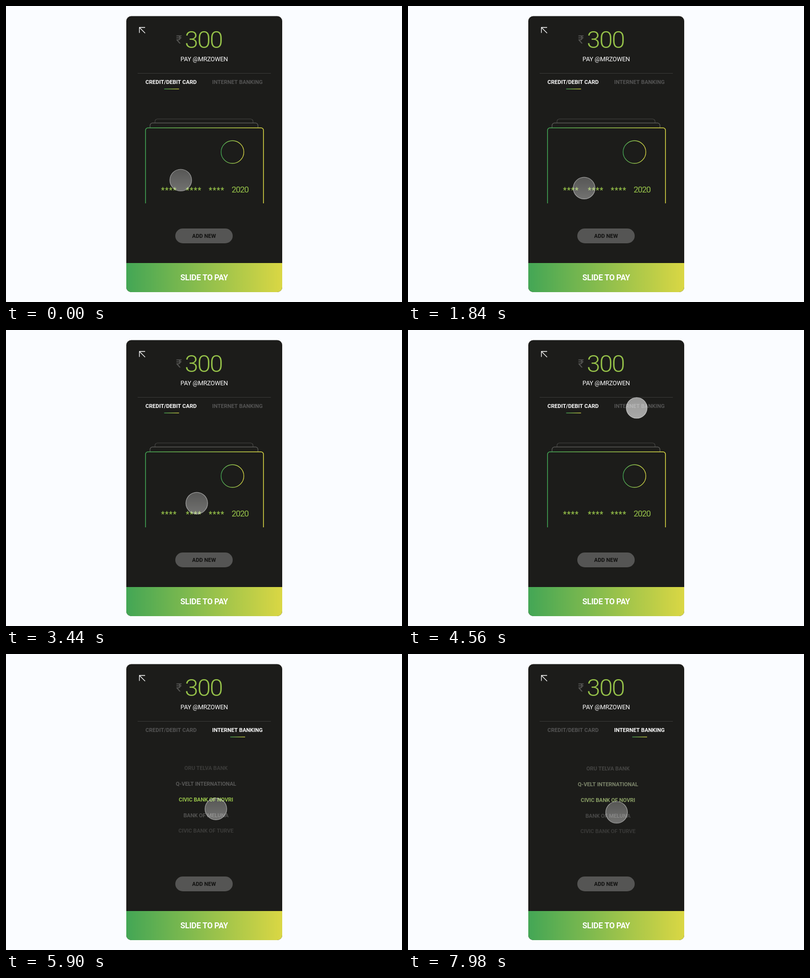
Animation, 800 px wide and 600 px high, one loop 8 s. Source, as an HTML page with a canvas:

```html
<!DOCTYPE html>
<html lang="en">
<head>
<meta charset="utf-8">
<title>Slide to pay</title>
<style>
  html, body { margin: 0; width: 100%; height: 100%; overflow: hidden; background: #fafcff; }
  canvas { display: block; }
</style>
</head>
<body>
<canvas id="stage" width="800" height="600"></canvas>
<script>
const ctx = document.getElementById('stage').getContext('2d');
const LOOP = 8000;
const GREEN = [151, 195, 74];
const DARK = '#1c1c1a';

// Touch point: time, x, y
const touchPath = [
  [0, 353, 353], [1280, 345, 375], [2660, 375, 359], [3400, 385, 352],
  [4400, 462, 158], [4940, 462, 158], [5560, 410, 350], [5880, 424, 314],
  [6620, 418, 342], [7300, 417, 345], [8160, 422, 318]
];

// Name, opacity when the third row is chosen, opacity when the second is
const banks = [
  ['DELVO SARUNDRI', 0.16, 0.16],
  ['ORU TELVA BANK', 0.16, 0.28],
  ['Q-VELT INTERNATIONAL', 0.3, 1],
  ['CIVIC BANK OF NOVRI', 1, 0.3],
  ['BANK OF MELUNA', 0.27, 0.16],
  ['CIVIC BANK OF TURVE', 0.16, 0.16]
];

const mix = (a, b, p) => a + (b - a) * p;
const clamp = v => Math.min(1, Math.max(0, v));
const ease = p => p * p * (3 - 2 * p);
const ramp = (t, from, to) => ease(clamp((t - from) / (to - from)));

function touchAt(t) {
  let i = 1;
  while (i < touchPath.length - 1 && t > touchPath[i][0]) i++;
  const a = touchPath[i - 1], b = touchPath[i];
  const p = ramp(t, a[0], b[0]);
  return [mix(a[1], b[1], p), mix(a[2], b[2], p)];
}

function gradient(x0, x1, from = '#43a655', to = '#dad744') {
  const g = ctx.createLinearGradient(x0, 0, x1, 0);
  g.addColorStop(0, from);
  g.addColorStop(1, to);
  return g;
}

function text(str, x, y, size, weight, color, spacing = 0) {
  ctx.font = `${weight} ${size}px Roboto, sans-serif`;
  ctx.letterSpacing = spacing + 'px';
  ctx.textAlign = 'center';
  ctx.fillStyle = color;
  ctx.fillText(str, x + spacing / 2, y);
}

function stroke(color, width, ...points) {
  ctx.beginPath();
  points.forEach(([x, y]) => ctx.lineTo(x, y));
  ctx.strokeStyle = color;
  ctx.lineWidth = width;
  ctx.stroke();
}

function roundBox(x, y, w, h, r, color) {
  ctx.beginPath();
  ctx.roundRect(x, y, w, h, r);
  ctx.fillStyle = color;
  ctx.fill();
}

function cardEdge(left, right, top, bottom, color, width) {
  const r = 5;
  ctx.beginPath();
  ctx.moveTo(left, bottom);
  ctx.arcTo(left, top, left + r, top, r);
  ctx.arcTo(right, top, right, top + r, r);
  ctx.lineTo(right, bottom);
  ctx.strokeStyle = color;
  ctx.lineWidth = width;
  ctx.stroke();
}

function drawHeader(tab) {
  stroke('#fff', 1.3, [269.5, 54.5], [269.5, 43.5], [281, 43.5]);
  stroke('#fff', 1.3, [269.5, 43.5], [281, 55]);
  text('₹', 349.5, 75.5, 23, 400, '#555553');
  text('300', 400, 85, 49, 300, '#97c34a', -2);
  text('PAY @MRZOWEN', 400.5, 111.5, 12.5, 400, '#fff', -0.2);
  stroke('#3a3a38', 1, [266, 136.5], [535, 136.5]);

  const shade = p => {
    const v = Math.round(mix(84, 255, p));
    return `rgb(${v},${v},${v})`;
  };
  text('CREDIT/DEBIT CARD', 333.5, 158, 11, 700, shade(1 - tab));
  text('INTERNET BANKING', 467.5, 158, 11, 700, shade(tab));
  const x = mix(319.5, 453, tab);
  stroke(gradient(x, x + 30), 1.3, [x, 168.2], [x + 30, 168.2]);
}

function drawCards() {
  cardEdge(301, 499, 229, 237, '#454543', 1.2);
  cardEdge(291, 509, 237.2, 247, '#61615f', 1.2);
  cardEdge(281.8, 520.2, 247, 400, gradient(282, 520), 1.5);
  ctx.beginPath();
  ctx.arc(457.5, 296, 23, 0, Math.PI * 2);
  ctx.strokeStyle = gradient(434, 481);
  ctx.lineWidth = 1.3;
  ctx.stroke();
  for (const x of [328.7, 378.7, 425]) text('****', x, 379, 16, 500, '#97c34a', 0.9);
  text('2020', 473.3, 378, 17, 400, '#97c34a', -1.1);
}

function drawBanks(t, fade) {
  const back = ramp(t, 7250, 8080);
  const shift = 32 * ramp(t, 5880, 6620) * (1 - back);
  const chosen = ramp(t, 6620, 6950) * (1 - ramp(t, 7500, 8320));
  banks.forEach(([name, first, second], i) => {
    let alpha = mix(first, second, chosen);
    if (i === 0) alpha *= shift / 32;
    if (i === banks.length - 1) alpha *= 1 - shift / 32;
    const tint = i === 3 ? 1 - chosen : i === 2 ? chosen : 0;
    const rgb = GREEN.map(c => Math.round(mix(225, c, tint)));
    const y = 299 + (i - 3) * 32 + shift - (i === 5 ? 1 : 0);
    ctx.globalAlpha = alpha * fade;
    text(name, 404, y, 11, 700, `rgb(${rgb})`, -0.1);
  });
  ctx.globalAlpha = 1;
}

function drawTouch(t) {
  const [x, y] = touchAt(t);
  const press = ramp(t, 4360, 4520) * (1 - ramp(t, 4640, 4860));
  const r = mix(22, 21, press);
  const fill = ctx.createLinearGradient(0, y - r, 0, y + r);
  fill.addColorStop(0, `rgba(255,255,255,${mix(0.26, 0.55, press)})`);
  fill.addColorStop(1, `rgba(255,255,255,${mix(0.38, 0.62, press)})`);
  ctx.beginPath();
  ctx.arc(x, y, r, 0, Math.PI * 2);
  ctx.fillStyle = fill;
  ctx.fill();
  ctx.strokeStyle = `rgba(255,255,255,${mix(0.5, 0.6, press)})`;
  ctx.lineWidth = 1.2;
  ctx.stroke();
}

function draw(t) {
  const tab = ramp(t, 4620, 4900);
  ctx.fillStyle = '#fafcff';
  ctx.fillRect(0, 0, 800, 600);
  roundBox(243, 20.5, 315, 559.5, 10, DARK);
  drawHeader(tab);

  ctx.globalAlpha = 1 - tab;
  drawCards();
  ctx.globalAlpha = 1;
  if (tab > 0) drawBanks(t, tab);

  roundBox(342, 451, 116, 30, 15, '#555554');
  text('ADD NEW', 400, 469.5, 11, 700, '#10100f');
  roundBox(243, 521, 315, 59, [0, 0, 10, 10], gradient(243, 558));
  text('SLIDE TO PAY', 400.5, 555.5, 16, 700, '#fff', -0.3);
  drawTouch(t);
}

const start = performance.now();
function tick() {
  draw((performance.now() - start) % LOOP);
  requestAnimationFrame(tick);
}
tick();
</script>
</body>
</html>
```
